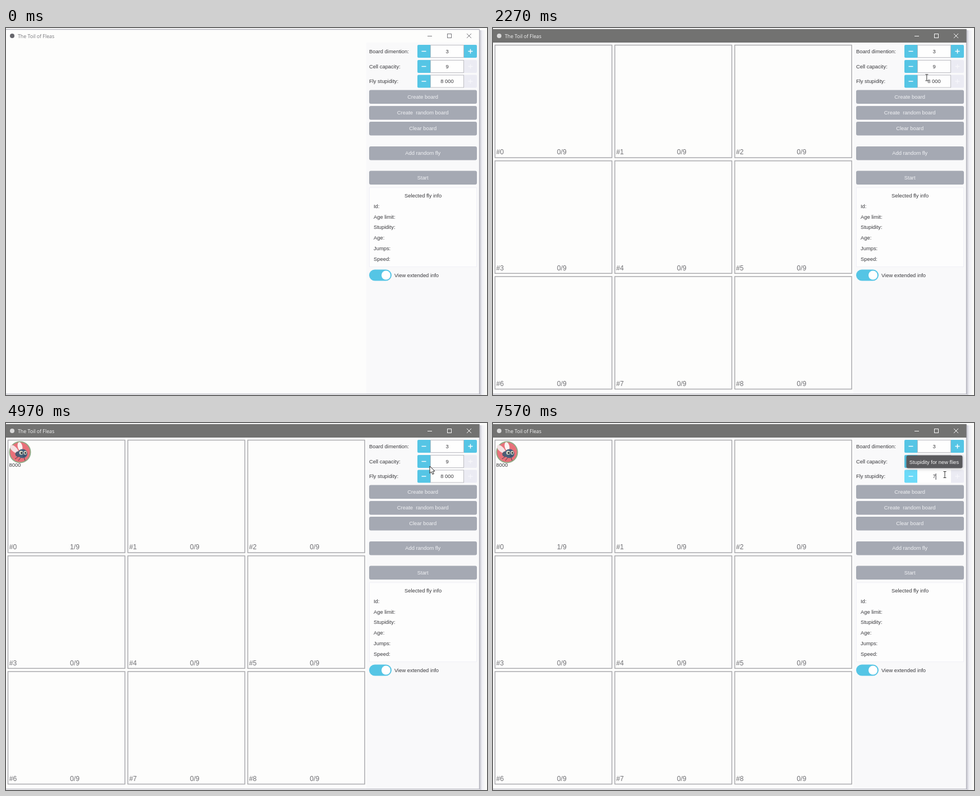
Write an HTML page with a canvas that moves like this. It is 857 px wide and 654 px high and loops after 8 s.

```html
<!DOCTYPE html>
<html lang="en">
<head>
<meta charset="utf-8">
<title>The Toil of Fleas</title>
<style>
html, body { margin: 0; width: 100%; height: 100%; overflow: hidden; background: #fcfcfd; }
canvas { display: block; }
</style>
</head>
<body>
<canvas id="stage" width="857" height="654"></canvas>
<script>
const LOOP = 8000;
const g = document.getElementById('stage').getContext('2d');
const SANS = '"Liberation Sans", Arial, sans-serif';
const CYAN = '#55c5e5', INK = '#3a3a3e';

// Moments of the interaction, in ms
const T = { enter: 930, activate: 1500, board: 1790, fly: 3630, focus: 5600,
            tip: 5860, select: 6330, erase: 7030, type: 7570 };

// Pointer tip: time, x, y
const path = [
  [T.enter, 790, -6], [1000, 790, 14], [1100, 790, 72], [1350, 785, 118], [1730, 780, 125],
  [2100, 779, 124], [2570, 762, 26], [2680, 755, 13], [2870, 458, 73], [3200, 97, 138],
  [4300, 97, 138], [4970, 755, 77], [5130, 757, 81], [5500, 800, 92], [5730, 805, 92],
  [LOOP, 805, 92]
];

function pointer(t) {
  const i = path.findIndex(p => p[0] > t);
  if (i < 1) return null;
  const [t0, x0, y0] = path[i - 1], [t1, x1, y1] = path[i];
  const k = (t - t0) / (t1 - t0);
  return { x: x0 + (x1 - x0) * k, y: y0 + (y1 - y0) * k };
}

const inside = (p, x, y, w, h) => p && p.x >= x && p.x < x + w && p.y >= y && p.y < y + h;

function rect(x, y, w, h, color, r = 0) {
  g.fillStyle = color;
  g.beginPath();
  g.roundRect(x, y, w, h, r);
  g.fill();
}

function frame(x, y, w, h, color, width = 1) {
  g.strokeStyle = color;
  g.lineWidth = width;
  g.strokeRect(x, y, w, h);
}

function line(color, width, ...pts) {
  g.strokeStyle = color;
  g.lineWidth = width;
  g.beginPath();
  for (let i = 0; i < pts.length; i += 4) {
    g.moveTo(pts[i], pts[i + 1]);
    g.lineTo(pts[i + 2], pts[i + 3]);
  }
  g.stroke();
}

function oval(x, y, rx, ry, color, angle = 0) {
  g.fillStyle = color;
  g.beginPath();
  g.ellipse(x, y, rx, ry, angle, 0, 7);
  g.fill();
}

function text(s, x, y, color = INK, align = 'left', size = 9.4, family = SANS) {
  g.font = `${size}px ${family}`;
  g.textAlign = align;
  g.textBaseline = 'alphabetic';
  g.fillStyle = color;
  g.fillText(s, x, y);
}

function drawWindow(t) {
  const active = t >= T.activate;
  rect(0, 0, 857, 654, '#fcfcfb');
  const shade = g.createLinearGradient(844, 0, 856, 0);
  shade.addColorStop(0, '#c8c8d0');
  shade.addColorStop(0.35, '#efeff4');
  shade.addColorStop(1, '#fcfcf9');
  rect(844, 4, 13, 650, shade);
  rect(0, 2, 843, 650, '#fdfdfc');
  rect(642, 26, 201, 626, '#f9f9fa');
  line('#b4b4be', 1.3, 0, 2.5, 843.5, 2.5, 843.5, 2.5, 843.5, 652, 0, 652.3, 844, 652.3);
  if (active) rect(0, 2, 843.5, 24, '#727271');

  const ink = active ? '#f6f6f6' : '#77777c';
  oval(11, 14, 4, 4, active ? '#d8d8d8' : '#66666c');
  text('The Toil of Fleas', 21, 17.6, ink, 'left', 8.8, '"Open Sans", sans-serif');

  // Hover tints of the window buttons fade once the pointer has left
  const fade = (from, to) => t < from ? 0 : Math.max(0, Math.min(1, 1 - (t - to) / 280));
  const max = fade(960, 1040), min = fade(2620, 2740);
  if (max) rect(773, 3, 35, 23, `rgba(225,225,228,${max * 0.35})`);
  if (min) rect(738, 3, 35, 23, `rgba(255,255,255,${min * 0.16})`);
  line(ink, 1, 751, 14.5, 759, 14.5);
  frame(786.5, 10.5, 7, 7, max > 0.2 ? '#e8e8ea' : ink);
  line(ink, 1, 821, 10, 829, 18, 829, 10, 821, 18);
}

function spinner(label, y, value, canAdd, focused) {
  text(label, 647, y + 14.5);
  rect(733, y, 23, 23, focused ? '#6cdaf8' : CYAN, [2, 0, 0, 2]);
  rect(756, y, 60, 23, '#fefefe');
  if (!focused) frame(756.5, y + 0.5, 59, 22, '#bcbcc2');
  rect(816, y, 23, 23, canAdd ? CYAN : '#ebebf3', [0, 2, 2, 0]);
  line('#fff', 1.4, 740.5, y + 11.5, 748.5, y + 11.5);
  line(canAdd ? '#fff' : '#f6f6fa', 1.4, 823.5, y + 11.5, 831.5, y + 11.5,
    827.5, y + 7.5, 827.5, y + 15.5);
  text(value, 786, y + 14.5, INK, 'center');
}

function button(label, y, p) {
  const hot = inside(p, 647, y, 192, 24.5);
  rect(647, y, 192, 24.5, hot ? '#62656d' : '#a5a9b3', 3);
  text(label, 742.7, y + 15.3, hot ? '#fff' : '#f0f1f4', 'center');
}

function drawPanel(t, p) {
  const focused = t >= T.focus;
  const value = t < T.erase ? '8 000' : t < T.type ? '' : '7';
  spinner('Board dimention:', 30, '3', true);
  spinner('Cell capacity:', 57, '9', false);
  spinner('Fly stupidity:', 83.5, value, false, focused);
  if (focused) {
    const half = g.measureText(value).width / 2;
    if (t >= T.select && t < T.erase) {
      rect(786 - half, 89, half * 2, 13, CYAN);
      text(value, 786, 98, '#fff', 'center');
    } else {
      line(INK, 1, 786.5 + half, 90, 786.5 + half, 101);
    }
  }

  button('Create board', 110.5, p);
  button('Create  random board', 139, p);
  button('Clear board', 167, p);
  button('Add random fly', 211, p);
  button('Start', 254.5, p);

  rect(647, 284, 192, 142, '#fdfdfd');
  frame(647.5, 284.5, 191, 141, '#f0f0f6');
  text('Selected fly info', 743, 301.5, INK, 'center');
  ['Id:', 'Age limit:', 'Stupidity:', 'Age:', 'Jumps:', 'Speed:']
    .forEach((s, i) => text(s, 655, 320.7 + i * 18.8));

  rect(647, 430.5, 40, 20, CYAN, 10);
  oval(677, 440.5, 8, 8, '#fff');
  text('View extended info', 692, 443.8);
}

function drawFly() {
  oval(25, 52, 19.5, 19.5, '#8fa985');
  oval(25, 52, 17.6, 17.6, '#e8717a');
  oval(14.5, 46.5, 9.5, 4.6, '#f4e2e4', 0.75);
  oval(25, 41.8, 8, 4.2, '#fbf2f2', 1.35);
  line('#46434f', 1, 22, 60, 16, 64, 26, 62, 22, 67, 32, 61, 34, 67);
  oval(22, 55.5, 5.5, 5, '#515a70');
  oval(29.5, 54.5, 8.6, 8, '#47607c');
  oval(27, 53, 3.4, 3.6, '#d9d9c4');
  oval(34.3, 53, 2.7, 3.3, '#d9d9c4');
  oval(27.8, 53.3, 1.7, 1.9, '#303640');
  oval(34.6, 53.3, 1.4, 1.7, '#303640');
  line('#303640', 0.9, 30, 59, 34, 58.8);
  text('8000', 5.5, 78.3);
}

function drawBoard(t) {
  for (let i = 0; i < 9; i++) {
    const x = 3 + (i % 3) * 213.6, y = 30 + Math.floor(i / 3) * 206.2;
    frame(x + 0.5, y + 0.5, 208.4, 200.6, '#aaaaae', 1.5);
    text('#' + i, x + 2.8, y + 195.3, '#707074', 'left', 12.1);
    text((i === 0 && t >= T.fly ? 1 : 0) + '/9', x + 119.5, y + 195.3, '#707074', 'center', 12.1);
  }
  if (t >= T.fly) drawFly();
}

function drawTip(t) {
  g.save();
  g.globalAlpha = Math.min(1, (t - T.tip) / 40);
  g.save();
  g.shadowColor = 'rgba(0,0,0,.2)';
  g.shadowBlur = 6;
  g.shadowOffsetY = 1;
  rect(736.5, 57.8, 100, 22.8, '#5a5a5d', 3);
  g.restore();
  text('Stupidity for new flies', 786, 72.5, '#f5f5f5', 'center', 9.35);
  g.restore();
}

const arrow = new Path2D('M0 0V12.5L2.9 9.8 5 14.4 7.2 13.4 5.2 9 9.1 8.8Z');
const hand = new Path2D('M0 1.2Q1.3-.8 2.5 1.2V6Q4 5 5 6.4 6.5 5.8 7.4 7.1 9.4 6.6 9.7 8.6V12' +
  'L8.3 16.5H1.6L-3.2 10.4Q-3.4 8.3-1.5 8.7L0 10Z');

function drawPointer(t, p) {
  const { x, y } = p;
  const inField = [30, 57, 83.5].some(top => inside(p, 756, top, 60, 23));
  const onCell = t >= T.board && inside(p, 3, 30, 636, 614);
  if (inField) {
    line('#333', 1, x, y - 5, x, y + 5, x - 2.5, y - 5.5, x + 2.5, y - 5.5,
      x - 2.5, y + 5.5, x + 2.5, y + 5.5);
    return;
  }
  g.save();
  g.translate(x, y);
  g.fillStyle = '#fff';
  g.strokeStyle = '#222';
  g.lineWidth = 1;
  const shape = onCell ? hand : arrow;
  g.fill(shape);
  g.stroke(shape);
  if (onCell) line('#222', 0.7, 2.5, 6, 2.5, 9, 5, 6.4, 5, 9, 7.4, 7.1, 7.4, 9.5);
  g.restore();
}

function draw(now) {
  const t = now % LOOP, p = pointer(t);
  drawWindow(t);
  if (t >= T.board) drawBoard(t);
  drawPanel(t, p);
  if (t >= T.tip) drawTip(t);
  if (p) drawPointer(t, p);
}

const start = performance.now();
function tick() {
  draw(performance.now() - start);
  requestAnimationFrame(tick);
}
tick();
</script>
</body>
</html>
```
